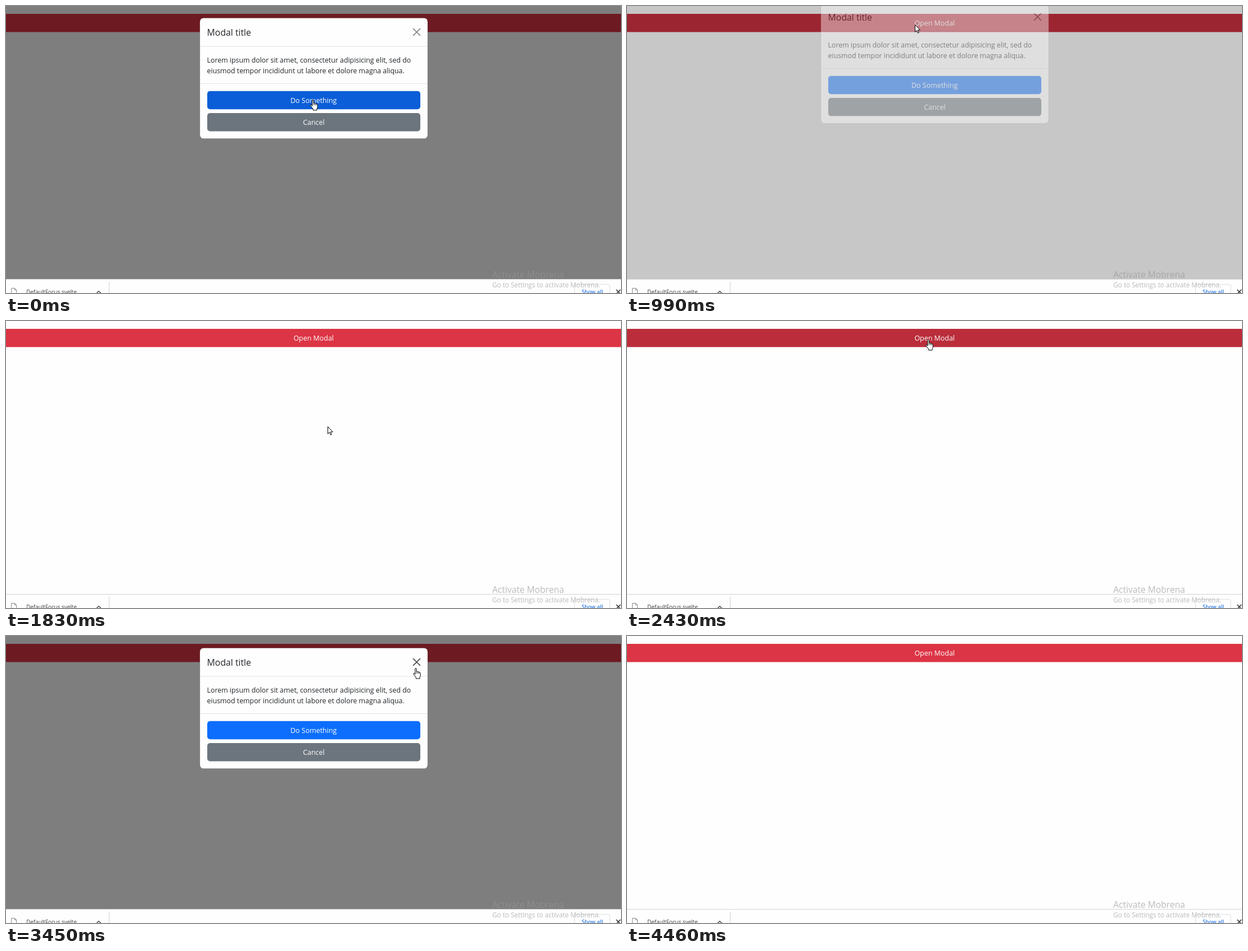
Animation of 1094x512 px, one loop 6.02 s. Source, as an HTML page:

```html
<!DOCTYPE html>
<html lang="en">
<head>
<meta charset="utf-8">
<title>Modal dialog</title>
<style>
  html, body { margin: 0; width: 100%; height: 100%; overflow: hidden; background: #fefefe; }
  svg { display: block; width: 100%; height: 100%; }
  text { font-family: "Open Sans", "Noto Sans", sans-serif; font-size: 12.35px; fill: #212529; }
  .label { font-size: 12.45px; fill: #fefefe; text-anchor: middle; }
  .mark text { fill: rgba(150, 150, 150, .65); }
  .line { fill: none; stroke: #dee2e6; }
  .pointer { fill: #fff; stroke: #000; stroke-linejoin: round; }
</style>
</head>
<body>
<svg viewBox="0 0 1094 512">
  <rect width="1094" height="512" fill="#fefefe"/>
  <rect id="bar" y="14" width="1094" height="32.5"/>
  <text class="label" x="547.2" y="35">Open Modal</text>
  <rect id="backdrop" width="1094" height="487"/>

  <g id="modal">
    <rect x="344.9" y="21.4" width="405.2" height="215.2" rx="6.5" fill="#fefefe" stroke="#000" stroke-opacity=".2" stroke-width=".8"/>
    <text x="357.6" y="52.8" style="font-size:15.8px;font-weight:500">Modal title</text>
    <rect id="ring" x="719.2" y="35.2" width="22.6" height="22.6" rx="5" fill="none" stroke="#0d6efd" stroke-opacity=".25" stroke-width="3.2"/>
    <path id="close" d="M724.5 40.5l12 12m0-12l-12 12" fill="none" stroke="#000" stroke-width="1.7" stroke-linecap="round"/>
    <path class="line" d="M345 72H750M345 138.5H750"/>
    <text x="357.6" y="100.8">Lorem ipsum dolor sit amet, consectetur adipisicing elit, sed do</text>
    <text x="357.6" y="120.2">eiusmod tempor incididunt ut labore et dolore magna aliqua.</text>
    <rect id="action" x="358" y="151.8" width="379" height="32.4" rx="5"/>
    <text class="label" x="547.2" y="173">Do Something</text>
    <rect id="cancel" x="358" y="191" width="379" height="32.4" rx="5"/>
    <text class="label" x="547.4" y="212">Cancel</text>
  </g>

  <g id="shelf">
    <rect y="487" width="1094" height="25" fill="#fefefe"/>
    <path d="M0 487.5H1094M183.5 492V512" stroke="#d2d2d2" fill="none"/>
    <path d="M9.5 514V503.5H15.5L18.5 506.5V514M15.5 503.5V506.5H18.5" fill="none" stroke="#8a8a8a"/>
    <text x="36" y="513.8" style="font-size:9.93px;fill:#3c4043">DefaultFocus.svelte</text>
    <path d="M161 512.5L165 508.7L169 512.5" fill="none" stroke="#4a4d50" stroke-width="1.5"/>
    <rect x="1011.5" y="496.7" width="62.5" height="24" rx="3" fill="none" stroke="#dadce0"/>
    <text x="1024" y="513" style="font-size:9.5px;font-weight:600;fill:#2f7de6">Show all</text>
    <path d="M1085.5 506l7.5 7.5m0-7.5l-7.5 7.5" stroke="#3c4043" stroke-width="1.7"/>
  </g>

  <g class="mark">
    <text x="865" y="485.4" style="font-size:15.6px">Activate Mobrena</text>
    <text x="865" y="502.2" style="font-size:11.72px">Go to Settings to activate Mobrena.</text>
  </g>

  <g id="hand" class="pointer">
    <path d="M3.8 11.4V1.7Q3.8 .5 5 .5T6.2 1.7V6.6Q7.4 5.5 8.6 6.8Q9.9 6.2 10.8 7.5Q13.2 7.4 13.2 9.6V13Q13.2 15 12 16.6V19H5.4V17L1 11.2Q.3 9.8 1.4 9.3Q2.7 9 3.8 11.4Z"/>
    <path d="M6.2 6.6V10M8.6 6.8V10.2M10.8 7.5V10.6" fill="none" stroke-width=".8"/>
  </g>
  <path id="arrow" class="pointer" d="M.5 .5V13.3L3.4 10.6L5.4 15.3L7.3 14.5L5.3 9.9H9.3Z"/>
  <path id="beam" fill="none" stroke="#000" stroke-width="1.1" d="M-3 -6.5H-1L0 -5.7L1 -6.5H3M0 -5.7V5.7M-3 6.5H-1L0 5.7L1 6.5H3"/>
</svg>

<script>
const $ = id => document.getElementById(id);
const LOOP = 6020;

// The picture refreshes in runs of 120 ms: [first refresh, count].
const RUNS = [[0, 8], [990, 13], [2700, 4], [3210, 4], [3840, 5], [4460, 1]];

// Opening and closing moment of each showing.
const SHOWS = [[-1000, 55], [925, 1645], [2620, 3773]];

// Pointer path: time, x, y, shape taken from that time on.
const PATH = [
  [0, 541, 167, 'hand'], [120, 541, 167, 'hand'], [240, 545, 158, 'arrow'],
  [720, 511, 34, 'hand'], [840, 507, 33, 'hand'], [990, 512, 33, 'arrow'],
  [1110, 522, 62, 'arrow'], [1230, 556, 165, 'hand'], [1350, 568, 198, 'hand'],
  [1710, 568, 198, 'hand'], [1830, 572, 188, 'arrow'], [2310, 536, 47, 'arrow'],
  [2430, 531, 33, 'hand'], [2700, 552, 40, 'arrow'], [2820, 680, 87, 'beam'],
  [3060, 730, 102, 'beam'], [3210, 730, 90, 'beam'], [3330, 728, 66, 'arrow'],
  [3450, 724, 57, 'hand'], [3570, 724, 54, 'hand'], [3840, 724, 54, 'hand'],
  [3960, 738, 78, 'arrow'], [4080, 800, 165, 'arrow'], [4320, 946, 373, 'arrow'],
  [4460, 946, 373, 'none']
];

const clamp = v => Math.min(1, Math.max(0, v));
const lerp = (a, b, k) => a + (b - a) * k;
const ramp = (t, from, length = 150) => clamp((t - from) / length);
const pulse = (t, on, off) => ramp(t, on) - ramp(t, off);
const mix = (a, b, k) => `rgb(${a.map((v, i) => Math.round(lerp(v, b[i], k)))})`;

// cubic-bezier(0, 0, .58, 1)
function easeOut(p) {
  let lo = 0, hi = 1;
  for (let i = 0; i < 20; i++) {
    const s = (lo + hi) / 2;
    if (1.74 * s * s * (1 - s) + s ** 3 < p) lo = s; else hi = s;
  }
  return lo * lo * (3 - 2 * lo);
}

function snap(t) {
  const [start, count] = RUNS.filter(r => r[0] <= t).pop();
  return start + 120 * Math.min(count - 1, Math.floor((t - start) / 120));
}

function drawModal(t) {
  const [open, close] = SHOWS.filter(s => s[0] <= t).pop();
  const fade = pulse(t, open, close);
  const lift = 1 - easeOut(ramp(t, open, 300)) + easeOut(ramp(t, close, 300));
  $('backdrop').setAttribute('opacity', fade / 2);
  $('modal').setAttribute('opacity', fade);
  $('modal').setAttribute('transform', `translate(0 ${-40.5 * lift})`);
}

function drawStates(t) {
  const bar = pulse(t, 690, 945) + pulse(t, 2280, 2575);
  const action = 1 - ramp(t, 160) + pulse(t, 1080, 1320);
  const cancel = pulse(t, 1340, 1760);
  const pressed = t > 3700 && t < 4400;
  $('bar').setAttribute('fill', mix([220, 53, 69], [187, 45, 59], bar));
  $('action').setAttribute('fill', mix([13, 110, 253], [11, 94, 215], action));
  $('cancel').setAttribute('fill', mix([108, 117, 125], [92, 99, 106], cancel));
  $('ring').setAttribute('opacity', pressed ? 1 : 0);
  $('close').setAttribute('opacity', pressed ? 1 : t >= 3450 && t < 3700 ? .75 : .5);
}

function drawPointer(t) {
  const i = PATH.findLastIndex(p => p[0] <= t);
  const a = PATH[i], b = PATH[i + 1] || a;
  const k = b === a ? 0 : (t - a[0]) / (b[0] - a[0]);
  for (const shape of ['hand', 'arrow', 'beam']) {
    $(shape).setAttribute('visibility', shape === a[3] ? 'visible' : 'hidden');
    $(shape).setAttribute('transform', `translate(${lerp(a[1], b[1], k)} ${lerp(a[2], b[2], k)})`);
  }
}

function render(time) {
  const t = snap(time % LOOP);
  drawModal(t);
  drawStates(t);
  drawPointer(t);
}

const begin = performance.now();
function tick() {
  render(performance.now() - begin);
  requestAnimationFrame(tick);
}
tick();
</script>
</body>
</html>
```
